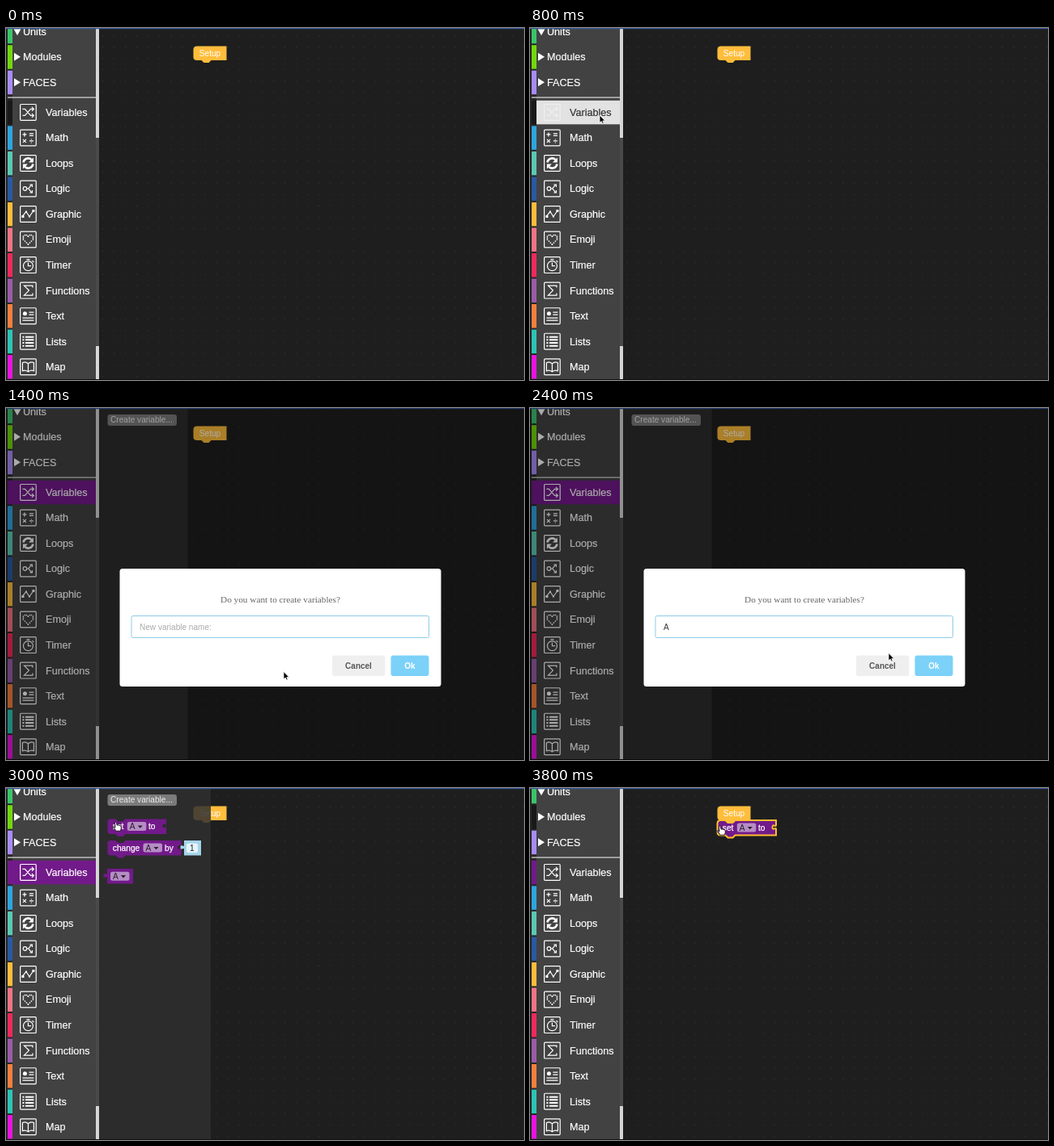
Write an HTML page that moves like this. It is 640x436 px and loops after 4000 ms.

```html
<!DOCTYPE html>
<html lang="en">
<head>
<meta charset="utf-8">
<title>Create a variable block</title>
<style>
html, body { margin: 0; width: 100%; height: 100%; overflow: hidden; background: #1e1e1e; }
svg { display: block; }
text { font: 12.6px "Liberation Sans", Arial, sans-serif; fill: #fff; }
.menu text { stroke: #fff; stroke-width: .2; }
.menu .dark text { fill: #333; stroke: #333; }
.icon { fill: none; stroke: #fff; stroke-width: 1.2; }
.icon .solid { fill: #fff; stroke: none; }
.dark .icon { opacity: .45; }
.small text, text.small { font-size: 10.2px; }
.block text { stroke: #fff; stroke-width: .25; }
.block .dim { fill: #222; stroke: none; }
text.title { font: 11.27px "Liberation Serif", Times, serif; fill: #666; }
.btn { font-size: 10px; font-weight: bold; }
</style>
</head>
<body>
<svg id="stage" width="640" height="436" viewBox="0 0 640 436"></svg>
<script>
const PURPLE = '#721a8a', AMBER = '#ffbd3c', BLACK = '#191919';
const stage = document.getElementById('stage');

const rect = (x, y, w, h, fill, r = 0, extra = '') =>
  `<rect x="${x}" y="${y}" width="${w}" height="${h}" rx="${r}" fill="${fill}" ${extra}/>`;
const label = (x, y, str, extra = '') => `<text x="${x}" y="${y}" ${extra}>${str}</text>`;
const path = (d, extra = '') => `<path d="${d}" ${extra}/>`;
const group = (id, body, extra = '') => `<g id="${id}" ${extra}>${body}</g>`;

// Heart made of small squares, mirrored around x = 10.
const heart = [[10, 6], [8, 4.5], [6, 4.5], [4, 6], [4, 8], [4, 10], [6, 12], [8, 14], [10, 16]]
  .flatMap(([x, y]) => [[x, y], [20 - x, y]])
  .map(([x, y]) => rect(x - .75, y - .75, 1.5, 1.5, '#fff', 0, 'stroke="none"')).join('');

const icons = {
  Variables: path('M3 6h3l7 8h4M3 14h3l7-8h4M14.5 3.5L17 6l-2.500 2.500M14.500 11.500L17 14l-2.500 2.500'),
  Math: path('M3 6h5M5.500 3.500v5M11.500 5h5M11.500 7.500h5M3.500 12l4 4M7.500 12l-4 4M11.500 14h5M14 11.500v1M14 15.500v1'),
  Loops: path('M4 9A6 6 0 0 1 14 5.500M16 11A6 6 0 0 1 6 14.500', 'stroke-width="2.600"') +
    path('M16.500 3v6h-6ZM3.500 17v-6h6Z', 'class="solid"'),
  Logic: '<circle cx="6" cy="10" r="2.300"/>' + path('M8.300 10h2l4-5M10.300 10l4 5M12 5h3v3M12 15h3v-3'),
  Graphic: path('M2.500 13l5-6 4 6 5-7') + path('M2 11.500h3v3H2ZM15 4.500h3v3h-3ZM6.500 6h2v2h-2ZM10.500 12h2v2h-2Z', 'class="solid"'),
  Emoji: heart,
  Timer: '<circle cx="10" cy="11" r="6"/>' + path('M10 7v4h3.500M8 3h4M15 4.500l2 2'),
  Functions: path('M15.500 6.500V4H5l6 6-6 6h10.500v-2.500'),
  Text: '<circle class="solid" cx="6" cy="7" r="2.500"/>' + path('M11 5.500h6M11 8.500h6M3 12.500h14M3 15.500h14'),
  Lists: path('M3 4.500h2M3 8.200h2M3 11.900h2M3 15.600h2M6.500 4.500H17M6.500 8.200H17M6.500 11.900H17M6.500 15.600H17', 'stroke-width="2"'),
  Map: path('M10 6v10M10 6Q6.500 3 3 5v10q3.500-1.500 7 1 3.500-2.500 7-1V5q-3.500-2-7 1Z')
};

const headings = [['Units', '#3cc46c'], ['Modules', '#72d80c'], ['FACES', '#a98cf8']];
const colors = [BLACK, '#2fa4e0', '#5bc9b4', '#2a59a0', AMBER, '#f07484',
  '#f02a5c', '#9a5ca8', '#f57f3c', '#2ec4b6', '#e815e0'];

function menu() {
  let s = rect(0, 0, 115, 436, '#262626') + rect(8, 0, 103, 436, '#424242') + rect(111, 0, 4, 436, '#4a4a4a');
  headings.forEach(([name, color], i) => {
    const y = 4.3 + i * 31.5;
    s += rect(2, y - 14.6, 6, 29.5, color, 0, `id="${name}"`);
    s += path(i ? `M10 ${y - 5}l8 5-8 5Z` : `M9.500 ${y - 3}h9l-4.500 8Z`, 'fill="#fff"');
    s += label(21, y + 4.5, name);
  });
  s += rect(2, 85.3, 109, 1.5, '#bdbdbd');
  Object.entries(icons).forEach(([name, art], i) => {
    const y = 104.4 + i * 31.53;
    const row = rect(17.6, y - 9.9, 19.6, 19.8, 'none', 1, 'class="icon"') +
      `<g class="icon" transform="translate(17.4 ${y - 10})">${art}</g>` + label(49, y + 4.4, name);
    s += rect(2, y - 14.6, 6, 29.5, colors[i], 0, `id="swatch${i}"`);
    if (i === 0) s += rect(8, y - 14.6, 103, 29.5, 'none', 0, 'id="rowFill"');
    s += group('row' + i, row);
  });
  return s + rect(111, 0, 4, 136, '#d6d6d6') + rect(111, 394, 4, 42, '#d6d6d6');
}

const field = (x, y, fill = '#b78cc6') => rect(x, y, 23.5, 11, fill, 2.5, 'class="field"') +
  label(x + 3, y + 9.2, 'A', 'class="dim"') + path(`M${x + 13} ${y + 4.3}h6l-3 3.400Z`, 'fill="#222"');

const bump = 'H22l-3 3h-6l-3-3H4';
const socket = 'V6c0 3-4.500-2.500-4.500 2.500s4.500-.5 4.500 2.500';
const stack = w => `M0 4Q0 0 4 0H10l3 3h6l3-3H${w}${socket}V18.500${bump}Q0 18.500 0 14.500Z`;

const setBlock = extra => path(stack(72.5), `class="body" fill="${PURPLE}" ${extra}`) +
  label(6.3, 12.6, 'set') + field(24.3, 3.6) + label(50.5, 12.6, 'to');

const flyBlocks =
  `<g transform="translate(125.500 38.500)">${setBlock('')}</g>` +
  `<g transform="translate(125.500 65)">${path(stack(91), `fill="${PURPLE}"`)}${label(6.3, 12.6, 'change')}` +
  field(44, 3.6) + label(70.5, 12.6, 'by') +
  path('M94.500 0H115.500V18.500H94.500V11c0-3-4.500 2.500-4.500-2.500s4.500.5 4.500-2.500Z', 'fill="#a5d5ea"') +
  rect(97.5, 3.5, 14, 11.5, '#e6f5fb', 2.5) + label(101.5, 12.8, '1', 'class="dim"') + '</g>' +
  `<g transform="translate(125 100)">${path('M0 0H32V18.500H0V11c0-3-4.500 2.500-4.500-2.500s4.500.5 4.500-2.500Z', `fill="${PURPLE}"`)}` +
  field(4, 3.8) + '</g>';

const dialog = rect(140.5, 199, 397, 146, '#fff', 3.5) +
  label(339, 241, 'Do you want to create variables?', 'class="title" text-anchor="middle"') +
  rect(155, 257.5, 367.5, 27, '#fff', 2, 'stroke="#8fcbe8"') +
  label(165, 275, 'New variable name:', 'id="entry" style="font-size:10.05px"') +
  rect(403, 306.5, 65.5, 25.5, '#efefef', 3) + rect(475.5, 306.5, 47, 25.5, '#7cd1f9', 3) +
  label(435.5, 323, 'Cancel', 'class="btn" text-anchor="middle" style="fill:#555"') +
  label(499, 323, 'Ok', 'class="btn" text-anchor="middle"');

const arrow = path('M0 0V9.500L2.200 7.500 3.600 10.600 5.200 9.900 3.900 6.900H6.800Z',
  'fill="#000" stroke="#fff" stroke-width=".8"');
const hand = path('M-2.500-5.500q1.500-1 2 .5l.6 3q3-.3 5 1.200.8 2.500-.6 6H-1.500Q-3-.0-4.800 1.500-5.500 0-4.500-.5L-2 1Z',
  'fill="#fff" stroke="#111" stroke-width=".9"');

stage.innerHTML =
  '<defs><pattern id="grid" x="119" y="9" width="14.060" height="14.060" patternUnits="userSpaceOnUse">' +
  rect(0, 0, 1, 1, '#393939') + '</pattern></defs>' +
  rect(0, 0, 640, 436, '#1e1e1e') + rect(115, 0, 525, 436, 'url(#grid)') +
  group('placed', setBlock('stroke-width="2"'), 'class="block small"') +
  path(`M231.500 27Q231.500 22.500 236 22.500H272.500V40H253.500l-3 3h-6l-3-3H236Q231.500 40 231.500 36Z`, `fill="${AMBER}"`) +
  label(252, 35, 'Setup', 'text-anchor="middle" style="font-size:10.1px"') +
  group('flyout', rect(115, 0, 110, 436, '#303030', 0, 'id="flyBack" opacity=".85"') +
    rect(125.5, 8, 85.5, 14, '#7b7b7b', 3) + label(129, 18.4, 'Create variable...', 'style="font-size:10.1px;fill:#eee"') +
    group('flyBlocks', flyBlocks, 'class="block"'), 'class="small"') +
  group('menu', menu(), 'class="menu"') +
  rect(0, 0, 640, 1.2, '#3b5b9e') + rect(0, 435, 640, 1, '#101010') +
  rect(0, 0, 640, 436, '#000', 0, 'id="shade"') +
  group('dialog', dialog) + group('arrow', arrow) + group('hand', hand);

const $ = id => document.getElementById(id);
const show = (id, on) => { $(id).style.display = on ? '' : 'none'; };
const set = (id, name, value) => $(id).setAttribute(name, value);
const within = (n, from, to) => n >= from && n <= to;

// Pointer keys: first tick, kind, x, y.
const pointer = [
  [0, ''], [1, 'arrow', 267, 150], [2, 'arrow', 180, 128], [3, 'arrow', 98, 111], [4, 'arrow', 86, 108],
  [6, 'hand', 165, 17], [7, 'arrow', 343, 326.5], [11, ''], [12, 'arrow', 443, 303.5],
  [13, 'hand', 501, 327], [14, 'arrow', 265, 150], [15, 'hand', 137, 48],
  [16, 'hand', 244, 69], [17, 'hand', 240, 55], [18, 'hand', 236, 53]
];

function draw(n) {
  const hover = within(n, 3, 4), open = within(n, 5, 15), asking = within(n, 7, 12);
  const made = n >= 13, snapped = n >= 17, active = n >= 18;

  set('rowFill', 'fill', hover ? '#e2e2e2' : open ? PURPLE : 'none');
  set('row0', 'class', hover ? 'dark' : '');
  set('swatch0', 'fill', open || active ? PURPLE : BLACK);
  set('Modules', 'fill', active ? BLACK : headings[1][1]);

  show('flyout', open);
  show('flyBlocks', made);
  set('flyBack', 'width', made ? 138 : 109.5);

  show('dialog', asking);
  set('shade', 'opacity', asking ? .33 : n === 13 ? .07 : 0);
  const typed = n >= 10;
  $('entry').textContent = typed ? 'A' : 'New variable name:';
  $('entry').style.fill = typed ? '#333' : '#aaa';

  show('placed', n >= 16);
  set('placed', 'transform', snapped ? 'translate(231.500 40)' : 'translate(233.800 60.500)');
  const body = $('placed').querySelector('.body');
  body.setAttribute('fill', active ? PURPLE : '#5c5a55');
  body.setAttribute('stroke', active ? '#ffbd2e' : '#a88c38');
  $('placed').querySelector('.field').setAttribute('fill', active ? '#b78cc6' : '#a9a7a5');

  const [, kind, x, y] = pointer.filter(k => k[0] <= n).pop();
  for (const id of ['arrow', 'hand']) {
    show(id, id === kind);
    if (id === kind) set(id, 'transform', `translate(${x} ${y})`);
  }
}

const start = performance.now();
let last = -1;
function tick() {
  const n = Math.floor((performance.now() - start) % 4000 / 200);
  if (n !== last) draw(last = n);
  requestAnimationFrame(tick);
}
tick();
</script>
</body>
</html>
```
